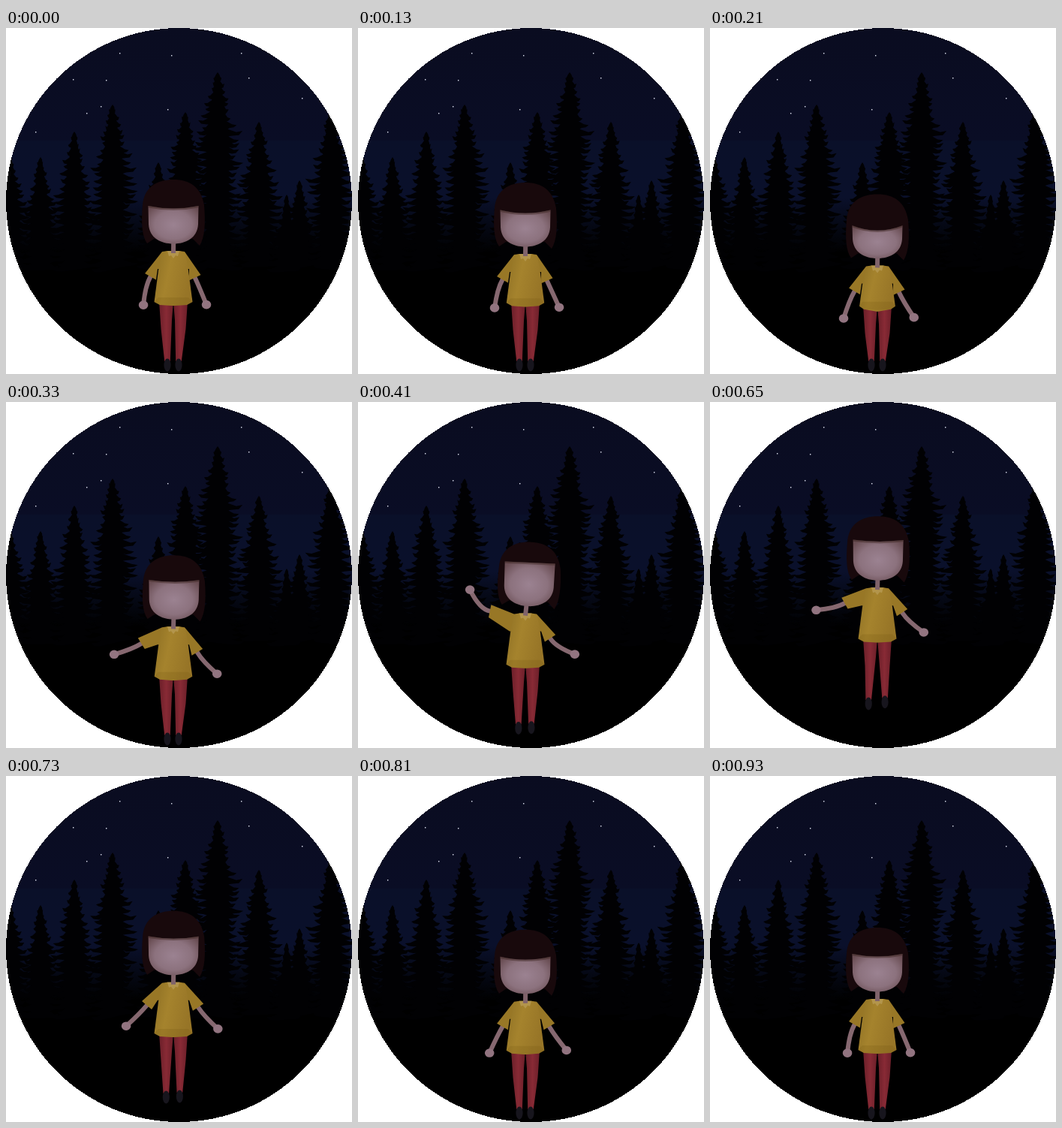
Write an HTML page that moves like this. It is 461 by 461 pixels and loops after 970 ms.

```html
<!DOCTYPE html>
<html lang="en">
<head>
<meta charset="utf-8">
<title>Night forest jump</title>
<style>
html, body { margin: 0; width: 100%; height: 100%; overflow: hidden; background: #fff; }
svg { display: block; width: 100vw; height: 100vh; }
</style>
</head>
<body>
<svg viewBox="0 0 461 461">
  <defs>
    <linearGradient id="sky" gradientUnits="userSpaceOnUse" x1="0" y1="0" x2="0" y2="461">
      <stop offset="0" stop-color="#0a0c20"/>
      <stop offset=".324" stop-color="#0a0d25"/>
      <stop offset=".326" stop-color="#0a1029"/>
      <stop offset=".49" stop-color="#0a102b"/>
      <stop offset=".55" stop-color="#060a1a"/>
      <stop offset=".65" stop-color="#000"/>
    </linearGradient>
    <radialGradient id="skin" cx=".5" cy=".5" r=".62">
      <stop offset="0" stop-color="#9b8291"/>
      <stop offset=".6" stop-color="#8c727e"/>
      <stop offset="1" stop-color="#6a4e54"/>
    </radialGradient>
    <linearGradient id="cloth" x1="0" y1="0" x2="1" y2=".3">
      <stop offset="0" stop-color="#8e7024"/>
      <stop offset=".45" stop-color="#a5832d"/>
      <stop offset="1" stop-color="#977527"/>
    </linearGradient>
    <linearGradient id="pants" x1="0" y1="0" x2="1" y2="0">
      <stop offset="0" stop-color="#6b1f29"/>
      <stop offset=".5" stop-color="#882a35"/>
      <stop offset="1" stop-color="#6b1f29"/>
    </linearGradient>
  </defs>
  <rect width="461" height="461" fill="url(#sky)"/>
  <path id="stars" fill="#d8dcea"/>
  <path id="trees" fill="#010103"/>
  <path id="legL" fill="url(#pants)"/>
  <path id="legR" fill="url(#pants)"/>
  <path id="shoes" fill="#17151d"/>
  <path id="arms" fill="none" stroke="#866870" stroke-width="6"/>
  <path id="hands" fill="#927480"/>
  <path id="sleeves" fill="#987726"/>
  <path id="shirt" fill="url(#cloth)"/>
  <path id="fold" fill="#6b5010" opacity=".18"/>
  <path id="collar" fill="#b3954c"/>
  <path id="neck" fill="none" stroke="#80636b" stroke-width="6"/>
  <g id="head">
    <path id="hair" fill="#18090c"/>
    <path id="face" fill="url(#skin)"/>
    <path id="shade" fill="none" stroke="#3a2420" stroke-width="2.5" opacity=".45"/>
  </g>
  <path fill="#fff" fill-rule="evenodd" shape-rendering="crispEdges"
    d="M-1-1H462V462H-1ZM0 230.5a230.5 230.5 0 1 0 461 0a230.5 230.5 0 1 0-461 0Z"/>
</svg>
<script>
const el = id => document.getElementById(id);
const draw = (id, d) => el(id).setAttribute('d', d);
const poly = pts => 'M' + pts.map(p => p[0].toFixed(1) + ' ' + p[1].toFixed(1)).join('L') + 'Z';
const oval = (x, y, rx, ry) => `M${x - rx} ${y}a${rx} ${ry} 0 1 0 ${2 * rx} 0a${rx} ${ry} 0 1 0 ${-2 * rx} 0Z`;

// ---- scenery
let seed = 7;
const rand = () => (seed = (seed * 16807) % 2147483647) / 2147483647;

const stars = [[151, 33], [220, 36], [313, 33], [89, 68], [133, 69], [323, 66],
  [126, 104], [107, 113], [215, 108], [39, 138], [394, 93]];
draw('stars', stars.map(([x, y]) => `M${x} ${y}h1.4v1.4h-1.4z`).join(''));

// tiers of ragged, drooping branches, wider towards the ground
function tree([x, top]) {
  const width = 31 - top * 0.035;
  const side = dir => {
    const pts = [];
    for (let d = 6; top + d < 320; d += 6 + rand() * 5) {
      const spread = width * Math.min(1.1, 0.1 + d / 85);
      const tip = spread * (0.75 + 0.4 * rand()), y = top + d;
      pts.push([x + dir * spread * 0.45, y - 3], [x + dir * tip * 0.75, y + 1], [x + dir * tip, y - 1 + 4 * rand()],
        [x + dir * tip * 0.85, y + 5], [x + dir * spread * 0.6, y + 6]);
    }
    return pts;
  };
  return poly([[x, top], ...side(1), ...side(-1).reverse()]);
}
draw('trees', [[5, 166], [46, 172], [91, 138], [142, 102], [203, 179], [239, 112],
  [282, 59], [337, 125], [374, 222], [391, 203], [433, 108]].map(tree).join(''));

// ---- motion
const ramp = (t, a, b) => Math.min(1, Math.max(0, (t - a) / (b - a)));
const ease = (t, a, b) => (1 - Math.cos(Math.PI * ramp(t, a, b))) / 2;
const bump = (t, a, b) => Math.sin(Math.PI * ramp(t, a, b)) ** 2;

function pose(t) {
  return {
    crouch: 20 * bump(t, 90, 360) + 5 * bump(t, 770, 920),
    lift: 47 * Math.sin(Math.PI / 2 * ramp(t, 350, 650)) * (1 - ease(t, 650, 800)),
    wave: ease(t, 235, 490) * (1 - ramp(t, 490, 800)) ** 1.5,
    spread: ease(t, 210, 400) * (1 - ease(t, 740, 930))
  };
}

// ---- figure
const reach = ([x, y], deg, r) => [x + r * Math.cos(deg * Math.PI / 180), y + r * Math.sin(deg * Math.PI / 180)];

function drawHead(x, top, drop) {
  const chin = top + 85.5, brow = top + drop, dip = (drop - 27) * 0.9, end = top + 87;
  el('head').setAttribute('transform', `rotate(${(x - 223) * 0.7} ${x} ${chin})`);
  draw('hair', `M${x - 35} ${end - 2}C${x - 42} ${end - 12} ${x - 43} ${top + 58} ${x - 41} ${top + 34}
    C${x - 39} ${top + 10} ${x - 22} ${top} ${x} ${top}C${x + 22} ${top} ${x + 37} ${top + 10} ${x + 41} ${top + 34}
    C${x + 43} ${top + 58} ${x + 42} ${end - 10} ${x + 35} ${end + 1}L${x + 26} ${end - 8}L${x - 26} ${end - 8}Z`);
  const line = y => `M${x - 33.5} ${y}Q${x} ${y + dip} ${x + 33.5} ${y}`;
  draw('face', `${line(brow)}L${x + 33} ${chin - 26}C${x + 32} ${chin - 8} ${x + 17} ${chin} ${x} ${chin}
    C${x - 17} ${chin} ${x - 32} ${chin - 8} ${x - 33} ${chin - 26}Z`);
  draw('shade', line(brow + 1));
  draw('neck', `M${x * 0.4 + 134} ${chin - 3}L223 ${top + 98}`);
}

function arm(dir, collar, upper, fore) {
  const shoulder = [223.5 + dir * 13.5, collar + 4];
  const cuff = reach(shoulder, upper, 35), elbow = reach(cuff, upper, 14), hand = reach(cuff, fore, 39);
  const back = reach(cuff, upper, -6);
  return {
    line: `M${back}L${cuff}Q${elbow} ${hand}`,
    hand: oval(...hand, 6.3, 5.8),
    sleeve: poly([[223 + dir * 8, collar], [223 + dir * 15, collar + 1], reach(cuff, upper - dir * 90, 8.5),
      reach(cuff, upper + dir * 90, 8.5), [223 + dir * 21, collar + 24], [223 + dir * 8, collar + 24]])
  };
}

function drawBody(collar, hem, lift, crouch) {
  const mirror = half => [...half.map(([x, y]) => [223 - x, y]), ...half.reverse().map(([x, y]) => [223 + x, y])];
  const wide = 25.5 - crouch * 0.08;
  draw('shirt', poly(mirror([[8, collar], [16, collar + 3], [20, collar + 26], [wide, hem - 4], [18, hem], [1, hem + 1 + crouch * 0.1]])));
  draw('fold', poly(mirror([[20, hem - 10], [wide, hem - 4], [18, hem], [0, hem + 1]])));
  draw('collar', poly(mirror([[8, collar], [6, collar + 7], [3, collar + 6], [0, collar + 10]])));

  const leg = (dir, foot, sole) => {
    const at = x => 223 + dir * x;
    draw(dir < 0 ? 'legL' : 'legR', poly([[at(19), hem - 5], [at(16.5), hem + 32], [foot + dir * 3.8, sole - 13],
      [foot - dir * 3.8, sole - 13], [at(2), hem + 20], [at(0), hem - 5]]));
    return oval(foot, sole - 8, 4.6, 8.5);
  };
  draw('shoes', leg(-1, 215 - lift * 0.08, 457 - lift) + leg(1, 230 + lift * 0.065, 457 - lift * 1.05));
}

function render(t) {
  const step = t < 130 ? 90 : 130 + Math.floor((t - 130) / 40) * 40;
  const { crouch, lift, wave, spread } = pose(step);
  const collar = 297 - lift * 1.06 + crouch, hem = 369 - lift * 1.05 + crouch * 0.3;
  drawHead(223 + 6 * wave * wave, collar - 95, 35 - 10 * wave + crouch * 0.35);
  drawBody(collar, hem, lift, crouch);
  const left = arm(-1, collar, 120 + 92 * wave, 104 + 138 * wave + 16 * spread + crouch * 0.4);
  const right = arm(1, collar, 65 - 8 * spread, 67 - 17 * spread - 22 * wave - crouch * 0.4);
  draw('arms', left.line + right.line);
  draw('hands', left.hand + right.hand);
  draw('sleeves', left.sleeve + right.sleeve);
}

const start = performance.now();
function tick() {
  render((performance.now() - start) % 970);
  requestAnimationFrame(tick);
}
tick();
</script>
</body>
</html>
```
